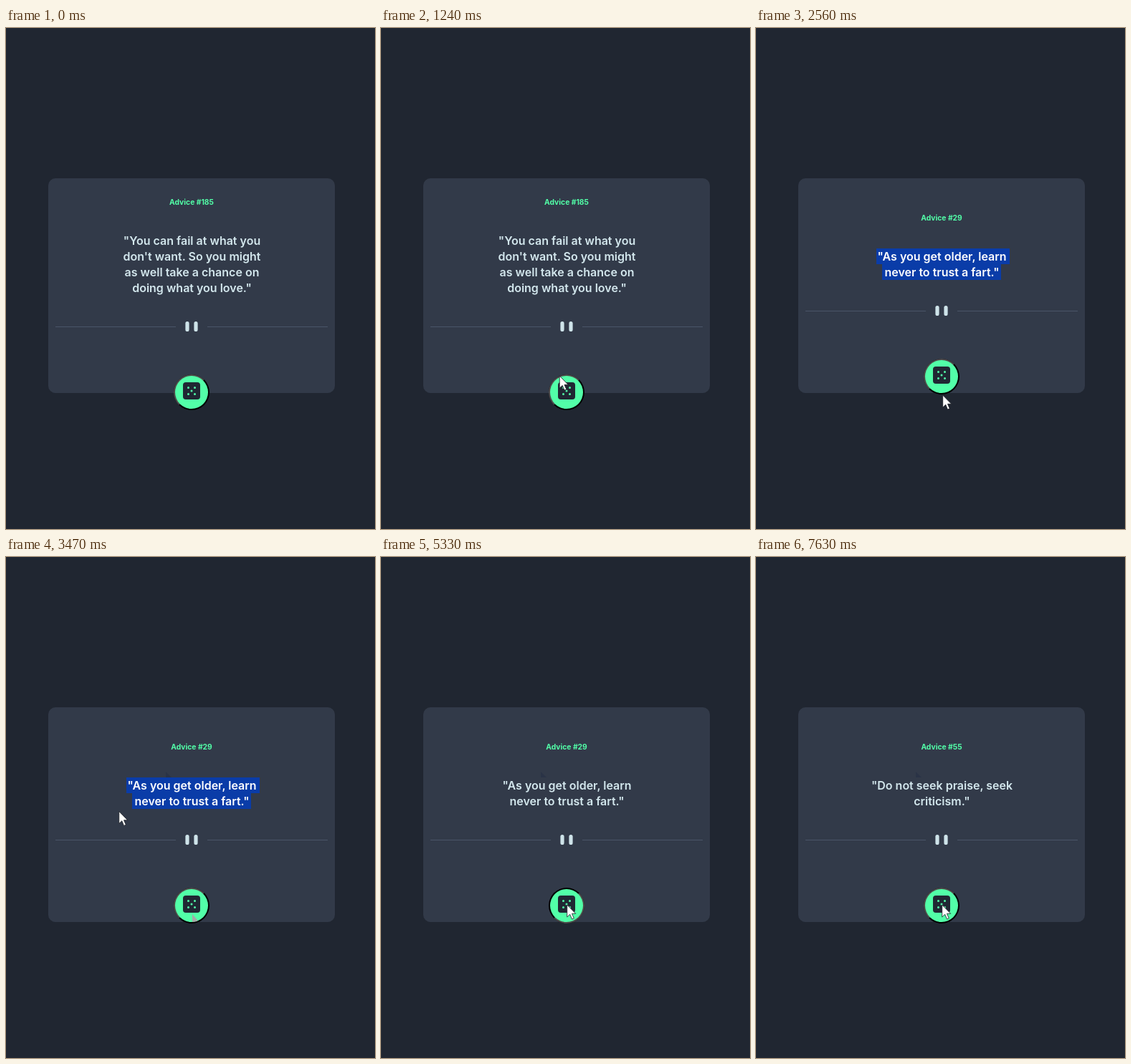
An HTML page that plays this animation: 515x700 px, repeating every 8000 ms.

```html
<!DOCTYPE html>
<html lang="en">
<head>
<meta charset="utf-8">
<title>Advice card</title>
<style>
  html, body { margin: 0; width: 100%; height: 100%; overflow: hidden; background: #202631; }
  svg { display: block; width: 515px; height: 700px; }
  text { font-family: Inter, "Open Sans", sans-serif; text-anchor: middle; }
  #title { font-size: 10.3px; font-weight: 700; fill: #52ffa8; }
  #quote { font-size: 16px; font-weight: 600; fill: #d3e7ed; }
  #quote.selected { fill: #fff; }
</style>
</head>
<body>
<svg viewBox="0 0 515 700">
  <rect x="59" y="210" width="400" height="300" rx="10" fill="#323a49"/>
  <text id="title" x="259"></text>
  <path id="selection" d="M168 308h186v22h-12v22h-166v-22h-8z" fill="#0a3ca8"/>
  <g id="quote"></g>
  <g id="lower">
    <path d="M69 417.5h168M281 417.5h168" stroke="#4a5568"/>
    <path d="M253 412.6v8.8M265 412.6v8.8" stroke="#cee3e9" stroke-width="5.2" stroke-linecap="round"/>
    <g transform="translate(259 509)">
      <g id="rim">
        <circle r="25"/>
        <path d="M17.7-17.7A25 25 0 0 0-17.7 17.7Z" fill="#4c4c4c"/>
      </g>
      <circle r="23" fill="#52ffa8"/>
      <rect x="-12" y="-14" width="24" height="24" rx="4" fill="#202733"/>
      <path d="M0-2h0M-4.5-6.5h0m9 0h0m0 9h0m-9 0h0" stroke="#52ffa8" stroke-width="3" stroke-linecap="round"/>
    </g>
  </g>
  <path id="greyTrail" d="M260 499l7 8v2l-7 1z" fill="#a5a9a8"/>
  <path id="darkTrail" d="M223 300l8 8h-8z" fill="#2a3346"/>
  <g id="cursor">
    <path d="M.7 1V18l4-3.7 2.8 6.7 2.8-1.2-2.8-6.5h5.2z"
          fill="#fff" stroke="#161a22" stroke-width=".8"/>
  </g>
</svg>
<script>
const LOOP = 8000;
const HOLD = 70; // the pointer moves about once per HOLD ms
const $ = id => document.getElementById(id);

const cards = [
  { from: 0, number: 185, lines: [
    '"You can fail at what you', "don't want. So you might",
    'as well take a chance on', 'doing what you love."'] },
  { from: 2560, number: 29, lines: ['"As you get older, learn', 'never to trust a fart."'] },
  { from: 6250, number: 55, lines: ['"Do not seek praise, seek', 'criticism."'] }
];

// Places where the pointer rests, and the strokes between them
const entry = [500, 700], aboveButton = [237, 416], underButton = [260, 512],
  left = [119, 445], nearButton = [223, 453], onButton = [259, 485], below = [269, 529];
const strokes = [
  { start: 320, end: 1090, path: [entry, [200, 280], aboveButton] },
  { start: 1170, end: 1490, path: [aboveButton, [254, 514], underButton] },
  { start: 2890, end: 3610, path: [underButton, [258, 400], [195, 295], left] },
  { start: 3740, end: 4510, path: [left, [177, 427], nearButton] },
  { start: 4580, end: 5130, path: [nearButton, onButton] },
  { start: 5670, end: 5950, path: [onButton, below] },
  { start: 6930, end: 7630, path: [below, onButton] }
];

// Catmull-Rom curve through evenly timed points
function along(points, u) {
  const last = points.length - 1;
  const i = Math.min(Math.floor(u * last), last - 1);
  const s = u * last - i;
  const [a, b, c, d] = [i - 1, i, i + 1, i + 2].map(k => points[Math.max(0, Math.min(k, last))]);
  return b.map((v, k) => v + s / 2 * (c[k] - a[k]
    + s * (2 * a[k] - 5 * v + 4 * c[k] - d[k] + s * (3 * (v - c[k]) + d[k] - a[k]))));
}

function pointerAt(t) {
  const stroke = strokes.findLast(s => t >= s.start);
  if (!stroke) return null;
  const { start, end, path } = stroke;
  const moves = Math.round((end - start) / HOLD);
  const step = Math.floor((t - start) / (end - start) * moves) + 1;
  return along(path, Math.min(step / (moves + 1), 1));
}

const within = (t, a, b) => t >= a && t < b;
const show = (id, on) => $(id).setAttribute('visibility', on ? 'visible' : 'hidden');

let current;
function showCard(card) {
  if (card === current) return;
  current = card;
  const shift = 11 * (4 - card.lines.length); // content stays centred
  $('title').textContent = 'Advice #' + card.number;
  $('title').setAttribute('y', 247 + shift);
  $('lower').setAttribute('transform', `translate(0 ${-shift})`);
  $('quote').innerHTML = card.lines
    .map((line, i) => `<text x="259.5" y="${303 + shift + 22 * i}">${line}</text>`).join('');
}

function draw(now) {
  const t = now % LOOP;
  showCard(cards.findLast(c => t >= c.from));

  const selected = within(t, 2560, 3740);
  show('selection', selected);
  $('quote').classList.toggle('selected', selected);

  const pressed = within(t, 1710, 1770) || within(t, 5330, 5470);
  $('rim').setAttribute('transform', `rotate(${pressed ? 180 : 0})`);

  show('greyTrail', within(t, 2960, 5330));
  show('darkTrail', t >= 3320);

  const pos = pointerAt(t);
  show('cursor', pos);
  if (pos) $('cursor').setAttribute('transform', `translate(${pos})`);
}

const begin = performance.now();
(function tick() {
  draw(performance.now() - begin);
  requestAnimationFrame(tick);
})();
</script>
</body>
</html>
```
